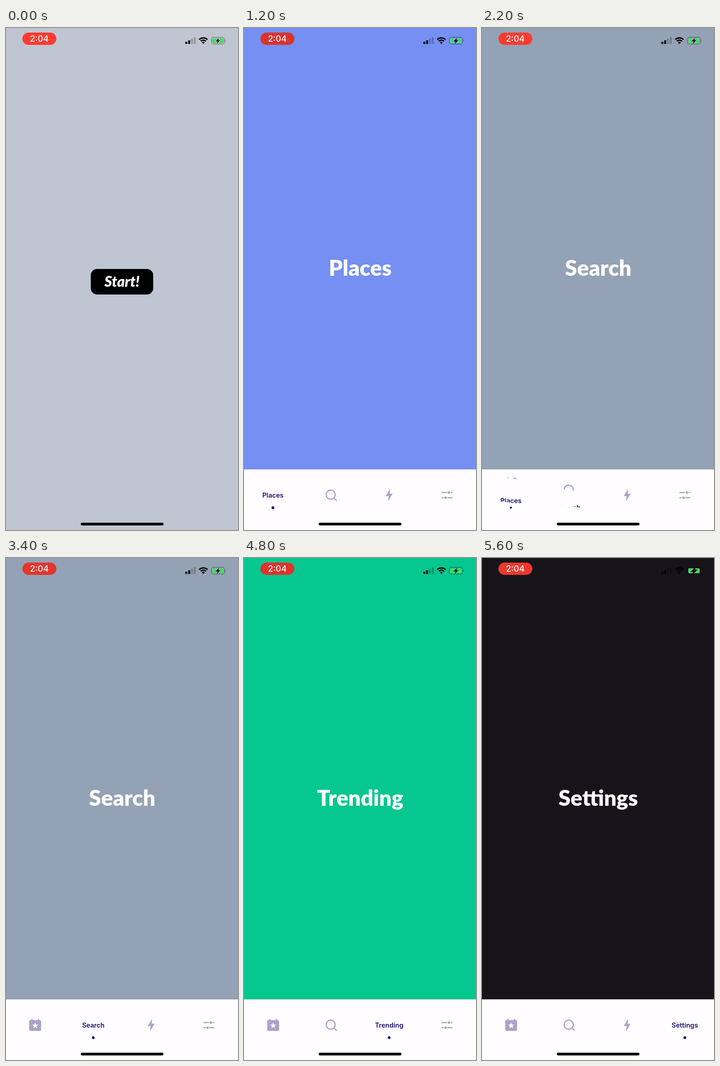
Recreate the animation shown at these times as an HTML page. Size 509x1100 px, loop 5800 ms.

```html
<!DOCTYPE html>
<html lang="en">
<head>
<meta charset="utf-8">
<title>Tab bar</title>
<style>
  html, body { margin: 0; width: 100%; height: 100%; overflow: hidden; background: #bfc6d2; }
  svg { display: block; width: 100vw; height: 100vh; }
  text { text-anchor: middle; }
  .title { font: 900 48px Lato, sans-serif; fill: #fffdff; }
  .start { font: italic 900 32px Lato, sans-serif; fill: #fff; }
  .label { font: 600 14.5px Inter, sans-serif; fill: #1d1270; }
  .clock { font: 500 18.5px Inter, sans-serif; fill: #fff; }
  .icon { fill: #a9a3c9; }
  .line { fill: none; stroke: #a9a3c9; stroke-width: 2.5; stroke-linecap: round; }
</style>
</head>
<body>
<svg viewBox="0 0 509 1100">
  <defs>
    <path id="charge" d="M467.2 21.8 460 29.2h4.3L462.8 34.4 470 26.8h-4.3z"/>
    <mask id="gap" maskUnits="userSpaceOnUse" x="445" y="15" width="45" height="26">
      <rect x="445" y="15" width="45" height="26" fill="#fff"/>
      <use href="#charge" fill="#000" stroke="#000" stroke-width="2.6"/>
    </mask>
  </defs>

  <rect width="509" height="1100" fill="#bfc6d2"/>
  <rect x="186" y="528" width="137" height="56" rx="14"/>
  <text class="start" x="254.5" y="567">Start!</text>

  <g id="sheet">
    <rect id="page" width="509" height="1100"/>
    <text id="title" class="title" x="255" y="542.5"></text>
    <rect y="967" width="509" height="133" fill="#fffdff"/>
    <rect y="966.6" width="509" height=".8" opacity=".15"/>
    <g id="tabs"></g>
  </g>

  <rect id="pill" x="36" y="10" width="74.5" height="27" rx="13.5"/>
  <text class="clock" x="73" y="30">2:04</text>
  <path d="M393.5 30h4.2v5h-4.2zM399.8 27h4.2v8h-4.2z"/>
  <path d="M405.9 23.5h4.2v11.5h-4.2zM412 20.3h4.2v14.7h-4.2z" opacity=".23"/>
  <g id="wifi" fill="none" stroke="#000"></g>
  <rect x="450.6" y="20.4" width="28.8" height="15" rx="4.5" fill="none" stroke="#000" stroke-width="1.2" opacity=".42"/>
  <path d="M480.9 25.5q2.2 2.4 0 4.8z" opacity=".45"/>
  <rect x="452.5" y="22.4" width="25" height="11" rx="2.6" fill="#4cd964" mask="url(#gap)"/>
  <use href="#charge"/>
  <rect x="164" y="1084" width="181.5" height="6" rx="3"/>
</svg>

<script>
const LOOP = 5800;
const TRAVEL = 38;      // distance an icon or label slides
const SWITCH = 400;     // length of a tab change
const LEAD = 12;        // the old tab starts slightly ahead
const SLANT = 0.13;

const star = Array.from({ length: 10 }, (_, i) => {
  const a = i * Math.PI / 5, r = i % 2 ? 3 : 7;
  return `${64 + r * Math.sin(a)},${1024.8 - r * Math.cos(a)}`;
}).join(' ');

const tabs = [
  { name: 'Places', x: 63.5, color: '#758ff2', tap: -9999,
    icon: `<rect class="icon" x="51" y="1012.5" width="26" height="23.7" rx="3"/>
      <path class="icon" d="M55.5 1010h2.6v4h-2.6zM70.2 1010h2.6v4h-2.6z"/>
      <polygon points="${star}" fill="#fffdff"/>` },
  { name: 'Search', x: 191.5, color: '#94a2b5', tap: 2060,
    icon: `<circle class="line" cx="190.2" cy="1022.6" r="10"/>
      <path class="line" d="M197.6 1030 203 1035.4"/>` },
  { name: 'Trending', x: 318.5, color: '#05c78f', tap: 3413,
    icon: '<path class="icon" d="M320.5 1010 311 1025.5h6.3L316 1037 326 1020.5h-6.4z"/>' },
  { name: 'Settings', x: 445, color: '#161418', tap: 4950,
    icon: `<path class="line" d="M434.2 1018H444.5M454.5 1018H456.3M434.2 1029.3H437M447 1029.3H456.3"/>
      <circle class="icon" cx="449.5" cy="1018" r="2.7"/>
      <circle class="icon" cx="442.2" cy="1029.3" r="2.7"/>` }
];

const $ = id => document.getElementById(id);

$('tabs').innerHTML = tabs.map((tab, i) => `
  <clipPath id="iconCut${i}"><polygon/></clipPath>
  <clipPath id="labelCut${i}"><polygon/></clipPath>
  <g id="icon${i}" clip-path="url(#iconCut${i})">${tab.icon}</g>
  <g id="label${i}" clip-path="url(#labelCut${i})">
    <text class="label" x="${tab.x}" y="1028.5">${tab.name}</text>
  </g>
  <circle id="dot${i}" cx="${tab.x}" cy="1051" fill="#1d1270"/>`).join('');

// Wi-Fi fan: arcs [radius, stroke width] around one foot point
$('wifi').innerHTML = [[13.2, 3.1], [8.4, 2.9], [2.4, 4.8]].map(([r, w]) => {
  const dx = r * Math.sin(0.76), y = 35 - r * Math.cos(0.76);
  return `<path d="M${433 - dx} ${y}A${r} ${r} 0 0 1 ${433 + dx} ${y}" stroke-width="${w}"/>`;
}).join('');

const clamp = v => Math.min(1, Math.max(0, v));
const smooth = v => (v = clamp(v), v * v * (3 - 2 * v));

// Keep only what lies above a slanted edge passing through (x, y)
function cut(id, x, y) {
  const dy = 60 * SLANT;
  $(id).firstElementChild.setAttribute('points',
    `${x - 60},900 ${x + 60},900 ${x + 60},${y + dy} ${x - 60},${y - dy}`);
}

const shift = (id, y) => $(id).setAttribute('transform', `translate(0 ${y})`);

function drawTab(tab, i, t) {
  const next = tabs[i + 1];
  const leaveAt = next ? next.tap - LEAD : Infinity;
  const leaving = t >= leaveAt;
  const active = leaving
    ? 1 - smooth((t - leaveAt) / SWITCH)
    : smooth((t - tab.tap) / SWITCH);

  const up = TRAVEL * active, down = TRAVEL - up;
  const hidden = leaving ? Math.max(0, 1.4 * up - 8.5) : 1.5 * up;
  shift('icon' + i, -up);
  cut('iconCut' + i, tab.x, 1040 - hidden);
  shift('label' + i, down);
  cut('labelCut' + i, tab.x, 1034 - 0.5 * down);
  $('icon' + i).style.display = active > 0.999 ? 'none' : '';
  $('label' + i).style.display = active < 0.001 ? 'none' : '';
  $('dot' + i).setAttribute('r', 3.1 * smooth(active));
}

function sheetOffset(t) {
  const k = Math.max(0, t - 487) * 0.018;
  const rest = 1100 * (1 + k) * Math.exp(-k);
  return rest < 0.5 ? 0 : rest;
}

function draw(t) {
  const page = tabs.filter(tab => t >= tab.tap).pop();
  $('page').setAttribute('fill', page.color);
  $('title').textContent = page.name;
  shift('sheet', sheetOffset(t));
  tabs.forEach((tab, i) => drawTab(tab, i, t));

  const glow = 0.5 + 0.5 * Math.cos((t - 80) / 2000 * 2 * Math.PI);
  $('pill').setAttribute('fill',
    `rgb(${217 + 38 * glow},${51 + 8 * glow},${44 + 4 * glow})`);
}

const began = performance.now();
function tick() {
  draw((performance.now() - began) % LOOP);
  requestAnimationFrame(tick);
}
tick();
</script>
</body>
</html>
```
